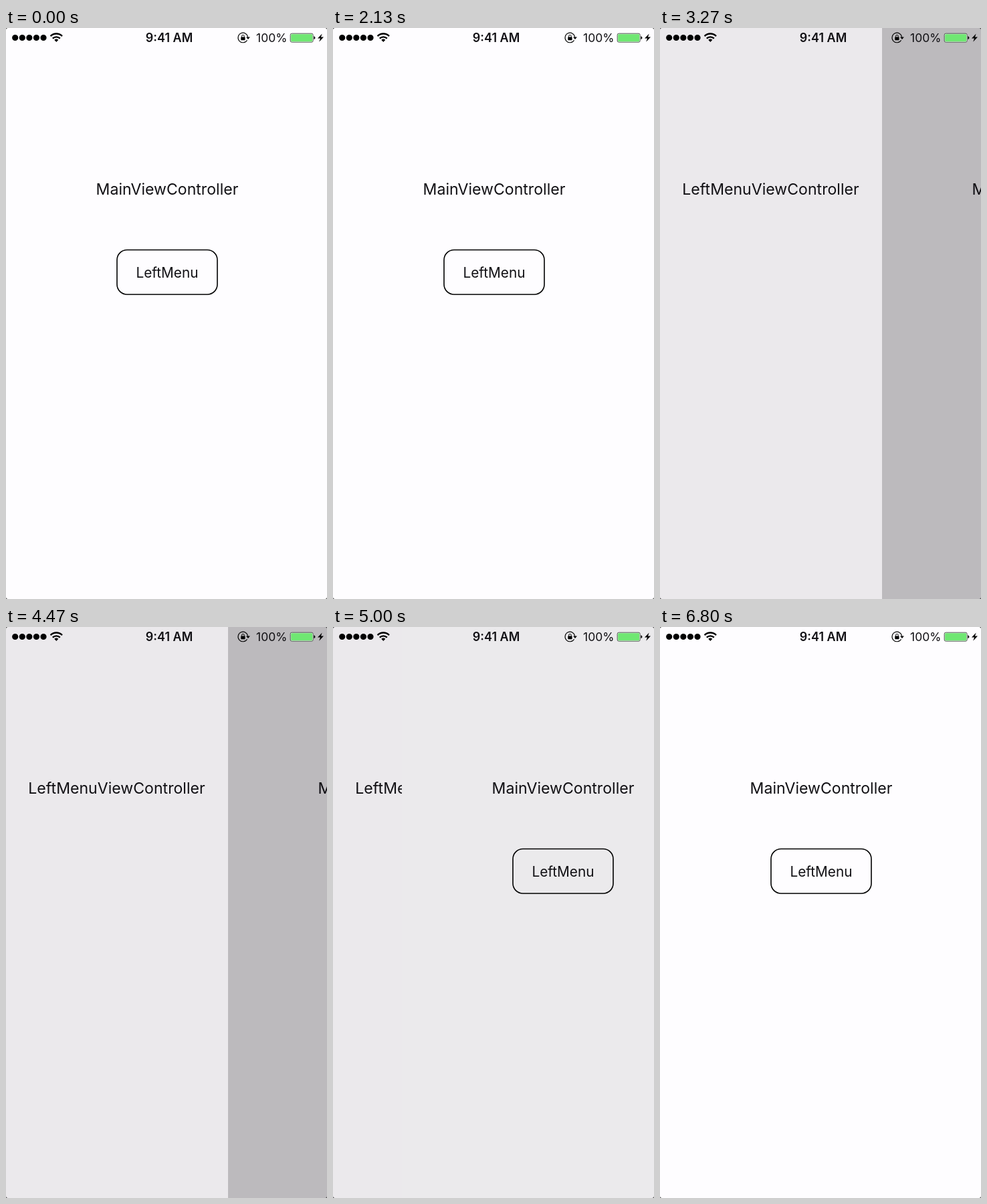
These frames come from a looping animation (480 px wide and 853 px high, 6870 ms). An HTML page:

```html
<!DOCTYPE html>
<html lang="en">
<head>
<meta charset="utf-8">
<title>Left menu</title>
<style>
  html, body { margin: 0; width: 100%; height: 100%; overflow: hidden; background: #fefdff; }
  svg { display: block; width: 480px; height: 853px; }
  text { font-family: Inter, Roboto, sans-serif; fill: #111014; }
  .title { font-size: 23.1px; }
  .line { fill: none; stroke: #000; }
</style>
</head>
<body>
<svg viewBox="0 0 480 853">
  <rect width="480" height="853" fill="#ebe9ec"/>
  <text class="title" x="165.5" y="248.5" text-anchor="middle">LeftMenuViewController</text>

  <g id="main">
    <rect width="480" height="853" fill="#fefdff"/>
    <text class="title" x="241" y="248.5" text-anchor="middle">MainViewController</text>
    <rect class="line" x="166" y="331.5" width="150" height="66.5" rx="15" stroke-width="1.6"/>
    <text x="241" y="372.5" font-size="20.8" text-anchor="middle">LeftMenu</text>
    <rect id="shade" width="480" height="853" fill="#040008" opacity="0"/>
  </g>

  <g id="status">
    <path class="line" d="M13.7 14.5H56.1" stroke-width="9.2" stroke-linecap="round" stroke-dasharray="0 10.58"/>
    <g class="line" stroke-width="2.4">
      <path d="M66.6 12.2a12.2 12.2 0 0 1 17.4 0"/>
      <path d="M69.8 15.6a7.8 7.8 0 0 1 11 0"/>
    </g>
    <path d="M75.3 21l-3-3.2a4.2 4.2 0 0 1 6 0z"/>
    <text x="244" y="21" font-size="18" font-weight="600" text-anchor="middle">9:41 AM</text>

    <path class="line" d="M360.6 18.2a7.3 7.3 0 1 1 1-4.4" stroke-width="1.1"/>
    <path d="M359 13.4h6l-3 3.6z"/>
    <rect x="351.3" y="13.6" width="6.2" height="4.6" rx=".6"/>
    <path class="line" d="M352.6 14v-1.8a1.8 1.8 0 0 1 3.6 0v1.8" stroke-width="1"/>

    <text x="420.5" y="21" font-size="17.5" text-anchor="end">100%</text>
    <rect x="425.2" y="8.2" width="34" height="13" rx="2.2" fill="#fff" stroke="#4b554d"/>
    <rect x="426.2" y="9.2" width="32" height="11" rx="1.2" fill="#6fe772"/>
    <path d="M460.4 12.3q2 .5 2 2.4t-2 2.4z"/>
    <path d="M472.6 8.4l-6.6 7h4l-1.8 5.4 6.8-7.2h-4z"/>
  </g>

  <path fill="#333" d="M0 0h3a3 3 0 0 0-3 3zM480 0v3a3 3 0 0 0-3-3zM0 853v-3a3 3 0 0 0 3 3zM480 853h-3a3 3 0 0 0 3-3z"/>
</svg>
<script>
const LOOP = 6870, STEP = LOOP / 103, MENU_WIDTH = 331.7;
const main = document.getElementById('main');
const shade = document.getElementById('shade');

function ease(time, start, duration) {
  const t = Math.min(1, Math.max(0, (time - start) / duration));
  return t * t * (3 - 2 * t);
}

function draw(now) {
  // The picture advances in steps of one fifteenth of a second.
  const time = Math.floor((now % LOOP + 8) / STEP) * STEP;
  const open = ease(time, 2250, 310) - ease(time, 4719, 450);
  main.setAttribute('transform', `translate(${Math.round(open * MENU_WIDTH)})`);
  shade.setAttribute('opacity', 0.267 * open ** 1.1);
}

const begin = performance.now();
function tick() {
  draw(performance.now() - begin);
  requestAnimationFrame(tick);
}
tick();
</script>
</body>
</html>
```
